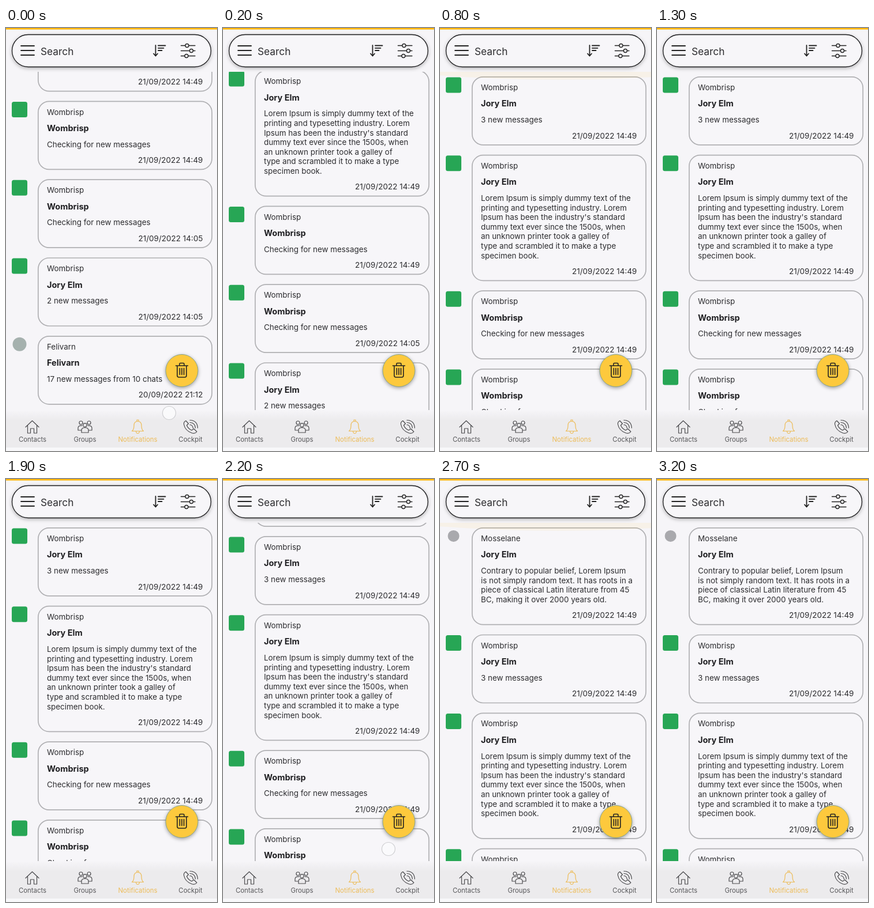
Write an HTML page that moves like this. It is 366 px wide and 734 px high and loops after 3.3 s.

```html
<!DOCTYPE html>
<html lang="en">
<head>
<meta charset="utf-8">
<title>Notifications</title>
<style>
  html, body { margin: 0; width: 100%; height: 100%; overflow: hidden; background: #f6f5f8; }
  svg { display: block; width: 100%; height: 100%; }
  text { font: 13.4px Inter, Roboto, sans-serif; fill: #2c2c2f; }
  .title { font-size: 14.5px; font-weight: 700; fill: #1f1f22; }
  .date { font-size: 13.5px; text-anchor: end; }
  .search { font-size: 17.3px; }
  .tab text { font-size: 11.4px; text-anchor: middle; fill: #58585b; }
  .tab.active text { fill: #edbc58; }
  .tab path { stroke: #4a4a4d; stroke-width: 1.2; }
  .tab.active path { stroke: #edbc58; }
  .line { fill: none; stroke: #222; stroke-linecap: round; stroke-linejoin: round; }
  .pill { filter: drop-shadow(0 2px 3px rgba(0,0,0,.28)); }
  .fab { filter: drop-shadow(0 2px 3px rgba(0,0,0,.35)); }
</style>
</head>
<body>
<svg viewBox="0 0 366 734" preserveAspectRatio="none">
  <defs>
    <clipPath id="viewport"><rect y="76" width="366" height="587"/></clipPath>
    <linearGradient id="fade" x2="0" y2="1">
      <stop stop-color="#f6f5f8"/><stop offset="1" stop-color="#ecebed"/>
    </linearGradient>
  </defs>
  <rect width="366" height="734" fill="#f6f5f8"/>
  <g clip-path="url(#viewport)">
    <g id="list"></g>
    <ellipse id="glow" cx="205" rx="549" fill="#ffb41e"/>
  </g>

  <rect width="366" height="2.6" fill="#ffb708"/>
  <rect class="pill" x="10.5" y="11.5" width="345" height="56" rx="28" fill="#f7f6f9" stroke="#1c1c1e" stroke-width="1.3"/>
  <path class="line" stroke-width="1.8" d="M26 31H49M26 39H49M26 47H49"/>
  <text class="search" x="60" y="47">Search</text>
  <path class="line" stroke-width="1.8" d="M259.5 30V48M256 44.5L259.5 48.5L263 44.5M264 30.5H276.5M264 34.8H273.5M264 39H270.5"/>
  <g class="line" stroke-width="1.4">
    <path d="M303.5 30.5H328M303.5 39.5H328M303.5 48.5H328"/>
    <g fill="#f7f6f9">
      <circle cx="314" cy="30.5" r="3"/><circle cx="321.5" cy="39.5" r="3"/><circle cx="313" cy="48.5" r="3"/>
    </g>
  </g>

  <rect y="663" width="366" height="18" fill="url(#fade)"/>
  <rect y="680" width="366" height="48" fill="#ecebed"/>
  <rect y="728" width="366" height="6" fill="#f8f8fa"/>
  <g id="tabs"></g>

  <g class="fab">
    <circle cx="305" cy="594.5" r="28" fill="#fdc93d" stroke="#86a287" stroke-width="1"/>
  </g>
  <path class="line" stroke-width="1.6" d="M294.5 586H315.5M301 585.5V583Q301 581.5 302.5 581.5H307.5Q309 581.5 309 583V585.5M297 586.5V603Q297 606 300 606H310Q313 606 313 603V586.5M301.4 590.5V601.5M305 590.5V601.5M308.6 590.5V601.5"/>
  <circle id="touch" r="11.5" fill="#fbfbfc" fill-opacity=".88" stroke="#cfcfd2" stroke-width="1.2"/>
</svg>
<script>
(() => {
  const LOOP = 3300, STEP = 100;
  const CARD_H = 118, LINE_H = 16.6, GAP = 17.8, FIRST_TOP = 84.9, LIST_TOP = 76;
  const byId = id => document.getElementById(id);
  const list = byId('list'), glowShape = byId('glow'), touchDot = byId('touch');

  function add(parent, tag, attrs, content = '') {
    const node = document.createElementNS('http://www.w3.org/2000/svg', tag);
    for (const key in attrs) node.setAttribute(key, attrs[key]);
    node.textContent = content;
    return parent.appendChild(node);
  }

  const PERSON = 'Jory Elm', CHAT = 'Wombrisp';
  const CHECKING = ['Checking for new messages'];
  const cards = [
    { app: 'Mosselane', title: PERSON, date: '21/09/2022 14:49', dot: ['#a9a9ad', 10], lines: [
      'Contrary to popular belief, Lorem Ipsum', 'is not simply random text. It has roots in a',
      'piece of classical Latin literature from 45', 'BC, making it over 2000 years old.'] },
    { app: CHAT, title: PERSON, date: '21/09/2022 14:49', lines: ['3 new messages'] },
    { app: CHAT, title: PERSON, date: '21/09/2022 14:49', lines: [
      'Lorem Ipsum is simply dummy text of the', 'printing and typesetting industry. Lorem',
      "Ipsum has been the industry's standard", 'dummy text ever since the 1500s, when',
      'an unknown printer took a galley of', 'type and scrambled it to make a type', 'specimen book.'] },
    { app: CHAT, title: CHAT, date: '21/09/2022 14:49', lines: CHECKING },
    { app: CHAT, title: CHAT, date: '21/09/2022 14:05', lines: CHECKING },
    { app: CHAT, title: PERSON, date: '21/09/2022 14:05', lines: ['2 new messages'] },
    { app: 'Felivarn', title: 'Felivarn', date: '20/09/2022 21:12', dot: ['#a5b1ae', 12],
      lines: ['17 new messages from 10 chats'] }
  ];

  let cardTop = FIRST_TOP;
  for (const { app, title, date, dot, lines } of cards) {
    const g = add(list, 'g', { transform: `translate(0 ${cardTop})` });
    const height = CARD_H + LINE_H * (lines.length - 1);
    add(g, 'rect', { x: 55.8, width: 301.4, height, rx: 19, fill: '#f7f6f9', stroke: '#b0b0b3', 'stroke-width': 1.7 });
    if (dot) add(g, 'circle', { cx: 23.5, cy: 14, r: dot[1], fill: dot[0] });
    else add(g, 'rect', { x: 10, y: .6, width: 27, height: 27, rx: 3.5, fill: '#27a655' });
    add(g, 'text', { x: 71, y: 23.2 }, app);
    add(g, 'text', { x: 71, y: 51.5, class: 'title' }, title);
    lines.forEach((line, i) => add(g, 'text', { x: 71, y: 79.3 + i * LINE_H }, line));
    add(g, 'text', { x: 341.5, y: height - 11.3, class: 'date' }, date);
    cardTop += height + GAP;
  }

  // Tab icons are drawn around x = 0.
  const head = (x, y, r) => `M${x - r} ${y}a${r} ${r} 0 1 0 ${2 * r} 0a${r} ${r} 0 1 0 ${-2 * r} 0`;
  const tabs = [
    ['Contacts', 46, 'M-12 692.5L-.5 681.5L11 692.5M-8.5 690V703H-3.5V695H2.5V703H7.5V690'],
    ['Groups', 137, head(-7, 685, 3) + head(7, 685, 3) + head(0, 689, 3.2) +
      'M-6 702V698Q-6 693.5 0 693.5T6 698V702ZM-6.5 698H-12V694Q-12 689.5 -5 689.8M6.5 698H12V694Q12 689.5 5 689.8'],
    ['Notifications', 228.5, 'M-10 699.5Q-6.5 697 -6.5 690Q-6.5 682.5 0 682.5T6.5 690Q6.5 697 10 699.5ZM-1.5 682V680H1.5V682M-3 700Q-2.5 703.5 0 703.5T3 700'],
    ['Cockpit', 320, 'M-8 681.5Q-12 683.5 -11.5 687.5Q-9.5 699 3 703Q8 704.5 11 700.5L6 695.5L2 698Q-4 695.5 -6.5 689.5L-3.5 686.5ZM-1 688.5Q4 689 4.5 694.5M-1 684.5Q8 685 8.5 694M-1 680.5Q12 681 12.5 694']
  ];
  for (const [label, x, icon] of tabs) {
    const g = add(byId('tabs'), 'g', {
      transform: `translate(${x} 0)`, class: label === 'Notifications' ? 'tab active' : 'tab'
    });
    add(g, 'path', { d: icon, class: 'line' });
    add(g, 'text', { y: 718 }, label);
  }

  const scrollKeys = [[0, -514.3], [200, -332.3], [300, -250], [400, -185.6],
    [2100, -185.6], [2200, -170.6], [2300, -75], [2400, 0]];
  const touches = { 0: [283, 668], 2100: [287, 621], 2200: [287, 642] };

  function track(keys, t) {
    const next = keys.findIndex(key => key[0] > t);
    if (next < 0) return keys[keys.length - 1][1];
    const [t0, a] = keys[next - 1], [t1, b] = keys[next];
    return a + (b - a) * (t - t0) / (t1 - t0);
  }

  // Edge glow: swells when the list hits its top, then recedes and slows down.
  function glowAt(t) {
    const peak = t < 2400 ? 500 : 2400;
    const age = t - peak;
    if (age < 0) return Math.max(0, 1 + age / 160);
    return Math.max(0, 1 - age / 600) ** 2;
  }

  function render(t) {
    list.setAttribute('transform', `translate(0 ${track(scrollKeys, t)})`);

    const glow = glowAt(t), scale = .75 * glow;
    glowShape.setAttribute('ry', 549 * scale);
    glowShape.setAttribute('cy', LIST_TOP + (73.5 - 549) * scale);
    glowShape.setAttribute('opacity', .15 * Math.sqrt(glow));

    const touch = touches[t];
    touchDot.setAttribute('visibility', touch ? 'visible' : 'hidden');
    if (touch) touchDot.setAttribute('transform', `translate(${touch})`);
  }

  const start = performance.now();
  function tick() {
    const t = (performance.now() - start) % LOOP;
    render(Math.floor(t / STEP) * STEP);
    requestAnimationFrame(tick);
  }
  tick();
})();
</script>
</body>
</html>
```
